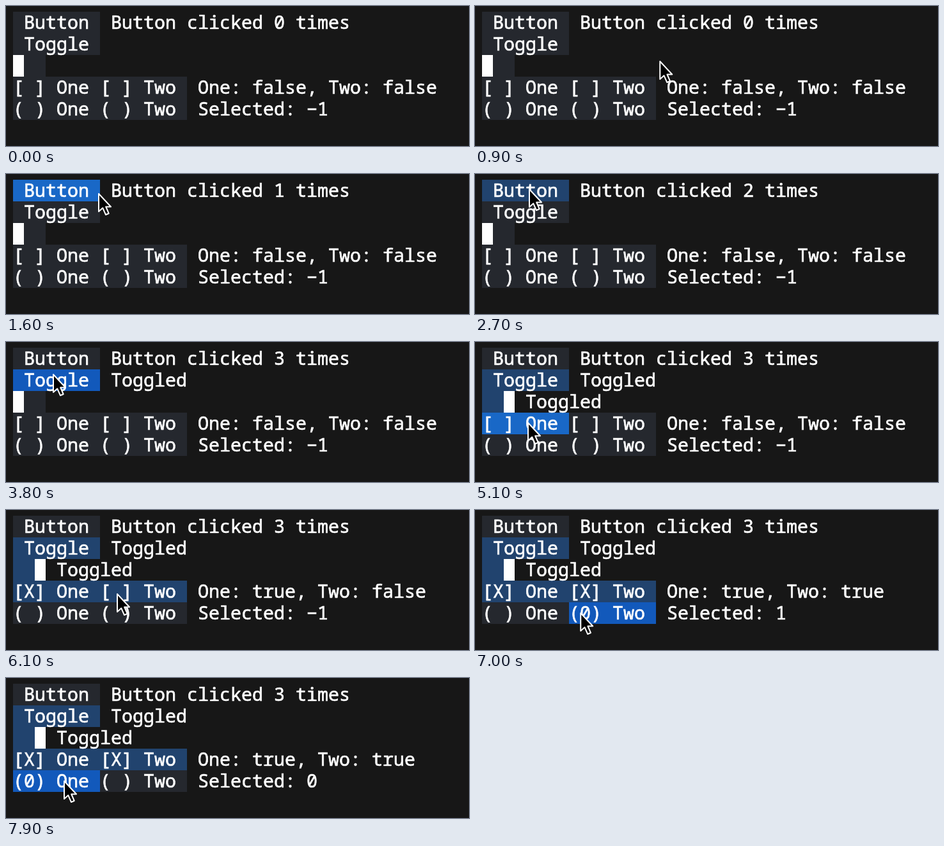
Animation, 724 px wide and 220 px high, one loop 8 s. Source, as an HTML page:

```html
<!DOCTYPE html>
<html lang="en">
<head>
<meta charset="utf-8">
<title>Terminal widgets</title>
<style>
  html, body { margin: 0; width: 100%; height: 100%; overflow: hidden; background: #171717; }
  svg { display: block; }
  text {
    font: 28.333px "Noto Sans Mono", "DejaVu Sans Mono", monospace;
    fill: #fff; stroke: #fff; stroke-width: 0.65px; white-space: pre;
  }
</style>
</head>
<body>
<svg id="stage" width="724" height="220" viewBox="0 0 724 220"></svg>
<script>
const LOOP = 8000, STEP = 100;
const LEFT = 11, TOP = 9, CELL = 17, ROW = 34;
const COLOR = { idle: '#25282e', hover: '#1968c7', on: '#21436e', onHover: '#1259bb' };

const stage = document.getElementById('stage');
const colX = col => LEFT + col * CELL;
const rowY = row => TOP + row * ROW;

function add(tag, attrs) {
  const node = document.createElementNS('http://www.w3.org/2000/svg', tag);
  for (const key in attrs) node.setAttribute(key, attrs[key]);
  return stage.appendChild(node);
}

function addBox(col, row, cells, fill) {
  return add('rect', { x: colX(col), y: rowY(row), width: cells * CELL, height: ROW, fill });
}

function addText(col, row) {
  return add('text', { x: colX(col), y: rowY(row) + 27 });
}

// id: [column, row, cells]
const areas = {
  button: [0, 0, 8], toggle: [0, 1, 8], slider: [0, 2, 3],
  checkOne: [0, 3, 8], checkTwo: [8, 3, 8],
  radioOne: [0, 4, 8], radioTwo: [8, 4, 8]
};
const widgets = Object.entries(areas).map(([id, [col, row, cells]]) => ({
  id, col, row, cells,
  box: addBox(col, row, cells, COLOR.idle),
  label: addText(col, row)
}));
const knob = addBox(0, 2, 1, '#fff');
const notes = [[9, 0], [9, 1], [4, 2], [17, 3], [17, 4]].map(p => addText(...p));
const pointer = add('path', {
  d: 'M1 2V30L7.3 24.3L12 35L16.7 33L12.2 22.5H20Z',
  fill: '#000', stroke: '#fff', 'stroke-width': 2, 'stroke-linejoin': 'round'
});

// time, x, y
const path = [
  [300, 640, 230], [400, 600, 206], [1200, 144, 29], [2100, 144, 29],
  [2300, 84, 22], [3100, 84, 22], [3300, 73, 49], [3900, 73, 49],
  [4300, 38, 81], [4700, 38, 81], [5000, 82, 125], [5500, 82, 125],
  [5900, 173, 130], [6400, 173, 130], [6700, 178, 160], [6900, 178, 160],
  [7300, 90, 160], [8000, 90, 160]
];

// press, release, widget
const clicks = [
  [1300, 1500, 'button'], [2400, 2500, 'button'], [2700, 2900, 'button'],
  [3400, 3600, 'toggle'], [4600, 4700, 'slider'],
  [5400, 5500, 'checkOne'], [6000, 6200, 'checkTwo'],
  [6800, 6900, 'radioTwo'], [7400, 7600, 'radioOne']
];

function pointerAt(t) {
  const i = path.findIndex(p => p[0] > t);
  if (i < 1) return [-100, -100];
  const [t0, x0, y0] = path[i - 1], [t1, x1, y1] = path[i];
  const u = (t - t0) / (t1 - t0), k = u * u * (3 - 2 * u);
  return [x0 + (x1 - x0) * k, y0 + (y1 - y0) * k];
}

function render(time) {
  const t = Math.floor(time / STEP) * STEP;
  const [px, py] = pointerAt(t);
  const count = id => clicks.filter(c => c[2] === id && t >= c[1]).length;
  const pressed = id => clicks.some(c => c[2] === id && t >= c[0] && t < c[1]);

  const selected = count('radioOne') ? 0 : count('radioTwo') ? 1 : -1;
  const on = {
    toggle: count('toggle') > 0, slider: count('slider') > 0,
    checkOne: count('checkOne') > 0, checkTwo: count('checkTwo') > 0,
    radioOne: selected === 0, radioTwo: selected === 1
  };
  const check = (id, name) => `[${on[id] ? 'X' : ' '}] ${name}`;
  const radio = (id, name) => `(${on[id] ? '0' : ' '}) ${name}`;
  const labels = {
    button: ' Button', toggle: ' Toggle', slider: '',
    checkOne: check('checkOne', 'One'), checkTwo: check('checkTwo', 'Two'),
    radioOne: radio('radioOne', 'One'), radioTwo: radio('radioTwo', 'Two')
  };

  for (const { id, col, row, cells, box, label } of widgets) {
    const dx = px - colX(col), dy = py - rowY(row);
    const hover = dx >= 0 && dx < cells * CELL && dy >= 0 && dy < ROW;
    const state = pressed(id) ? 'on'
      : on[id] ? (hover ? 'onHover' : 'on')
      : hover ? 'hover' : 'idle';
    box.setAttribute('fill', COLOR[state]);
    label.textContent = labels[id];
  }

  knob.setAttribute('x', colX(on.slider ? 2 : 0));
  [
    `Button clicked ${count('button')} times`,
    on.toggle ? 'Toggled' : '',
    on.slider ? 'Toggled' : '',
    `One: ${on.checkOne}, Two: ${on.checkTwo}`,
    `Selected: ${selected < 0 ? '\u22121' : selected}`
  ].forEach((line, i) => { notes[i].textContent = line; });
  pointer.setAttribute('transform', `translate(${px} ${py})`);
}

const start = performance.now();
function tick() {
  render((performance.now() - start) % LOOP);
  requestAnimationFrame(tick);
}
render(0);
requestAnimationFrame(tick);
</script>
</body>
</html>
```
